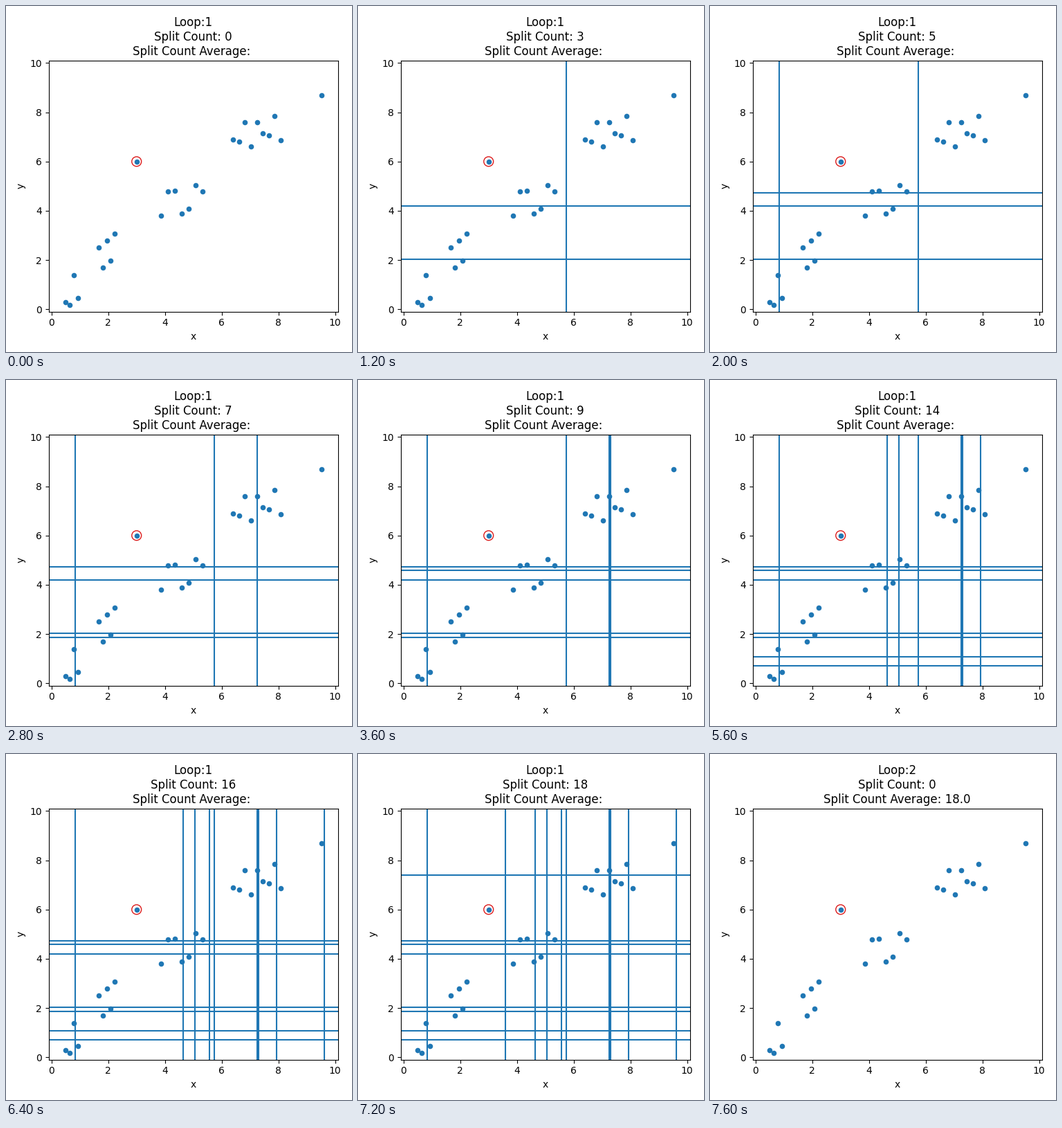
Write a matplotlib script that moves like this. It is 500 px wide and 500 px high and loops after 8 s.

```python
import matplotlib.pyplot as plt
import numpy as np
from matplotlib.animation import FuncAnimation

FRAME_MS = 400
OUTLIER = (3.0, 6.0)
# Random cuts in drawing order, one axis letter per value
SPLIT_AXES = "xyyxyyxyxxxxyyxxyx"
SPLIT_VALUES = [5.73, 4.2, 2.03, 0.83, 4.73, 1.87, 7.25, 4.59, 7.29,
                7.93, 5.05, 4.63, 0.71, 1.08, 9.61, 5.56, 7.4, 3.6]


def cluster(start, end, count, swing, turn, peak):
    """Evenly spaced points that swing around the line from start to end."""
    points = np.linspace(start, end, count)
    points[:, 1] += swing * np.cos(turn * (np.arange(count) - peak))
    return points


def title_text(loop, count, average=""):
    return f"Loop:{loop}\nSplit Count: {count}\nSplit Count Average: {average}"


points = np.vstack([
    cluster((0.50, 0.43), (0.94, 0.87), 4, swing=0.66, turn=2.25, peak=2),
    cluster((1.67, 2.03), (2.23, 2.59), 5, swing=0.47, turn=np.pi, peak=0),
    cluster((3.85, 4.30), (5.33, 4.50), 7, swing=0.65, turn=1.65, peak=1.5),
    cluster((6.40, 7.00), (8.08, 7.40), 9, swing=0.55, turn=2.51, peak=1.8),
    [OUTLIER, (9.52, 8.68)],
])

fig, ax = plt.subplots(figsize=(5, 5), dpi=100)
ax.scatter(*points.T, s=20, color="tab:blue")
ax.scatter(*OUTLIER, s=100, facecolors="none", edgecolors="#dd1c1c", linewidths=1)
ax.set(xlim=(-0.1, 10.1), ylim=(-0.1, 10.1), xlabel="x", ylabel="y")
title = ax.set_title(title_text(1, 0))
fig.tight_layout()
# Nudge the axes a quarter pixel to the left
margins = fig.subplotpars
fig.subplots_adjust(left=margins.left - 0.0005, right=margins.right - 0.0005)

draw_split = {"x": ax.axvline, "y": ax.axhline}
lines = [draw_split[axis](value, color="tab:blue", visible=False)
         for axis, value in zip(SPLIT_AXES, SPLIT_VALUES)]


def update(frame):
    done = frame > len(lines)
    count = 0 if done else frame
    for i, line in enumerate(lines):
        line.set_visible(i < count)
    title.set_text(title_text(2, 0, float(len(lines))) if done
                   else title_text(1, count))
    return [title, *lines]


anim = FuncAnimation(fig, update, frames=len(lines) + 2, interval=FRAME_MS,
                     repeat=True, repeat_delay=0)
plt.show()
```
